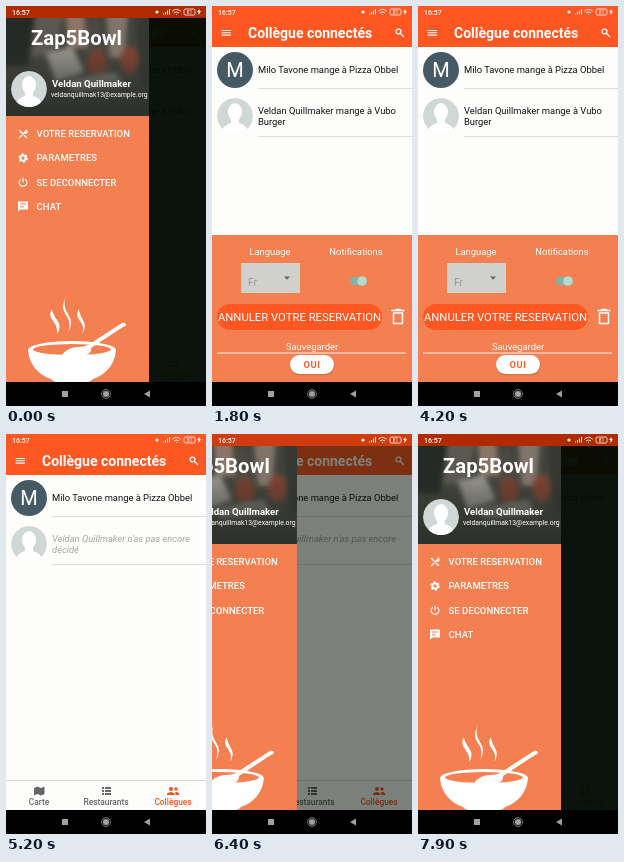
Recreate the animation shown at these times as an HTML page. Size 200 by 400 pixels, loop 8000 ms.

```html
<!DOCTYPE html>
<html lang="fr">
<head>
<meta charset="utf-8">
<style>
  html, body { margin: 0; width: 100%; height: 100%; overflow: hidden; background: #000; }
  svg { display: block; width: 100vw; height: 100vh; font-family: Roboto, sans-serif; font-size: 9.4px; }
  .bold { font-weight: 700; }
  .mid { font-weight: 500; }
  .center { text-anchor: middle; }
  .white { fill: #fff; }
  .line { fill: none; stroke: #fff; stroke-linecap: round; stroke-linejoin: round; }
</style>
</head>
<body>
<svg viewBox="0 0 200 400">
  <defs>
    <filter id="soft" x="-30%" y="-30%" width="160%" height="160%"><feGaussianBlur stdDeviation="2.500"/></filter>
    <linearGradient id="dusk" x2="0" y2="1">
      <stop offset=".35" stop-color="#2b2e29" stop-opacity="0"/>
      <stop offset="1" stop-color="#2b2e29" stop-opacity=".9"/>
    </linearGradient>
    <clipPath id="header"><rect y="12" width="143" height="98"/></clipPath>
    <clipPath id="face"><circle r="18"/></clipPath>
    <g id="person" clip-path="url(#face)">
      <circle r="18" fill="#d0d8d5"/>
      <ellipse cy="-4" rx="7" ry="9" fill="#fff"/>
      <path d="M-4 2H4V7Q13 9 14 19H-14Q-13 9-4 7Z" fill="#fff"/>
    </g>
    <g id="people">
      <circle cx="-2" cy="-2" r="2"/><circle cx="3" cy="-2" r="1.7"/>
      <path d="M-6 4V2.5Q-2-.5 1.500 2.500V4ZM2.500 4V2L2 1Q5.500 .5 6 2.500V4Z"/>
    </g>
  </defs>

  <rect width="200" height="376" fill="#fdfefc"/>
  <rect width="200" height="41" fill="#ff5722"/>
  <path class="line" stroke-width="1.1" stroke-linecap="butt" d="M10 24.500H18.500M10 26.800H18.500M10 29.100H18.500"/>
  <text class="bold white" x="36" y="32" font-size="14">Collègue connectés</text>
  <g class="line" stroke-width="1.2"><circle cx="186.500" cy="25.500" r="2.400"/><path d="M188.500 27.500L191.500 30.500"/></g>

  <circle cx="23" cy="64" r="18" fill="#455a64"/>
  <text class="white center" x="23" y="71" font-size="20">M</text>
  <text x="46" y="67" fill="#111">Milo Tavone mange à Pizza Obbel</text>
  <use href="#person" x="23" y="110"/>
  <g id="decided" fill="#111">
    <text x="46" y="108">Veldan Quillmaker mange à Vubo</text>
    <text x="46" y="119">Burger</text>
  </g>
  <g id="undecided" fill="#a3a5a3" font-style="italic">
    <text x="46" y="108">Veldan Quillmaker n'as pas encore</text>
    <text x="46" y="119">décidé</text>
  </g>
  <path d="M46 82.500H200M46 130.500H200" stroke="#d5d8d5" stroke-width=".8"/>

  <path d="M0 346.500H200" stroke="#d8dad8"/>
  <g class="center mid" font-size="8.4" fill="#666">
    <path d="M28 354l3.500-1.500 3.500 1.500 3.500-1.500V360l-3.500 1.500-3.500-1.500-3.500 1.500Z"/>
    <text x="33" y="371">Carte</text>
    <path d="M96 354H98M99 354H105M96 357H98M99 357H105M96 360H98M99 360H105" stroke="#666" stroke-width="2"/>
    <text x="100" y="371">Restaurants</text>
    <g fill="#f4511e"><use href="#people" x="167" y="357"/><text x="167" y="371">Collègues</text></g>
  </g>

  <g id="sheet">
    <rect y="229" width="200" height="147" fill="#f47f51"/>
    <g class="white center">
      <text x="58" y="249">Language</text>
      <text x="144" y="249">Notifications</text>
      <text x="100" y="344">Sauvegarder</text>
    </g>
    <rect x="29" y="257" width="59" height="30" fill="#d0d1cc"/>
    <text x="36" y="280" font-size="10" fill="#969894">Fr</text>
    <circle id="pick" cx="75" cy="272" r="10" fill="#9da3a0"/>
    <path d="M72 270.500H78L75 273.700Z" fill="#606663"/>
    <rect id="track" x="138" y="271" width="17" height="8" rx="4"/>
    <circle id="thumb" cy="275" r="4.800"/>
    <rect x="5" y="298" width="165" height="26" rx="13" fill="#ff5722"/>
    <text class="white center" x="87.500" y="315.300" font-size="11.300">ANNULER VOTRE RESERVATION</text>
    <circle id="press" cx="186" cy="311" r="10.500" fill="#fbab89"/>
    <path class="line" stroke-width="1.5" stroke-linecap="butt" d="M180 304.500H192M184 303.500H188"/>
    <path id="bin" class="line" stroke-width="1.500" d="M181.500 307H190.500V317.500H181.500Z"/>
    <path d="M5 347H194" stroke="#fff" stroke-width=".9"/>
    <rect x="78" y="350" width="45" height="19.500" rx="9.700" fill="#c76440" opacity=".5"/>
    <rect id="ok" x="78" y="349" width="44" height="19" rx="9.500"/>
    <text class="bold center" x="100" y="362" fill="#f4612f" letter-spacing=".5">OUI</text>
  </g>

  <rect id="scrim" y="12" width="200" height="364" fill="#020b03"/>

  <g id="drawer">
    <rect y="12" width="143" height="364" fill="#f47f51"/>
    <g clip-path="url(#header)">
      <rect y="12" width="143" height="98" fill="#41433c"/>
      <g filter="url(#soft)">
        <path d="M-8 8H30L22 60H-8Z" fill="#272b27"/>
        <path d="M30 8H58L48 50H26Z" fill="#5a5851"/>
        <path d="M40 48L66 40L78 66L50 76Z" fill="#8e8d86"/>
        <path d="M60 8H78L82 42H62Z" fill="#8c7567"/>
        <path d="M78 20L92 12L100 44L82 50Z" fill="#4b4a43"/>
        <ellipse cx="91" cy="57" rx="10" ry="13" fill="#74402f"/>
        <path d="M100 8H122L118 52H104Z" fill="#81746a"/>
        <ellipse cx="123" cy="54" rx="9" ry="14" fill="#7b4331"/>
        <path d="M130 8H150V80H134Z" fill="#353731"/>
        <path d="M62 74L110 66L118 80L66 86Z" fill="#77766f"/>
      </g>
      <rect y="12" width="143" height="98" fill="url(#dusk)"/>
    </g>
    <g class="white">
      <text class="bold" x="25" y="39" font-size="20.300">Zap5Bowl</text>
      <use href="#person" x="23" y="83"/>
      <text class="bold" x="46" y="81" font-size="9.600">Veldan Quillmaker</text>
      <text x="45" y="91.200" font-size="6.800">veldanquillmak13@example.org</text>
    </g>
    <rect id="tap" y="140" width="143" height="24" fill="#fff"/>
    <g class="white mid" font-size="9.500">
      <text x="30.600" y="131">VOTRE RESERVATION</text>
      <text x="30.600" y="155.300">PARAMETRES</text>
      <text x="30.600" y="179.700">SE DECONNECTER</text>
      <text x="30.600" y="204">CHAT</text>
      <path d="M12 195.500H22V203.500H14L12 206Z"/>
    </g>
    <path d="M14 198H20M14 200.800H18" stroke="#f47f51"/>
    <g class="line" stroke-width="1.300">
      <path d="M13.500 131.500L19.500 125.500M13.500 124.500L20.500 131.500M19.500 125.500L20.500 124M18.500 126.500L20 127.300L21.300 125.500"/>
      <circle cx="17" cy="152" r="2.600" stroke-width="1.900"/>
      <circle cx="17" cy="152" r="4" stroke-width="1.500" stroke-linecap="butt" stroke-dasharray="2.100 2.100"/>
      <path stroke-width="1.100" d="M17 172V176M14.500 173.500A3.900 3.900 0 1 0 19.500 173.500"/>
    </g>
    <g class="white">
      <path d="M22 344C23 359 33 369 45 373Q47 376 50 376H82Q85 376 87 373C99 369 109 359 110 344Z"/>
      <ellipse cx="66" cy="344" rx="44" ry="9"/>
      <ellipse cx="66" cy="343.500" rx="39" ry="5.500" fill="#f47f51"/>
      <path d="M56 349Q62 341 72 341Q78 341 82 339L116 317Q120 316 120 319Q120 320 117 321L85 342Q86 347 80 349Z"/>
      <path d="M46 303Q42 309 47 315T51 328Q56 321 51 314T46 303Z"/>
      <path d="M60 291Q54 301 60 309T62 326Q68 317 62 308T60 291Z"/>
      <path d="M73 303Q69 309 74 315T76 328Q81 321 77 314T73 303Z"/>
    </g>
  </g>

  <rect id="shade" width="200" height="12" fill="#b02b00"/>
  <g class="white">
    <text class="mid" x="6" y="8.700" font-size="7">16:57</text>
    <circle cx="151" cy="6" r="1.600"/>
    <path d="M157 8.500V7.500H158V8.500ZM159 8.500V6H160V8.500ZM161 8.500V4.500H162V8.500ZM163 8.500V3H164V8.500Z"/>
    <path class="line" stroke-width=".9" d="M166.500 5Q170.500 1.500 174.500 5M168.300 6.700Q170.500 5 172.700 6.700M170.500 8.300V8.400"/>
    <rect x="178" y="3" width="11" height="6" rx="1.500" fill="none" stroke="#fff" stroke-width=".8"/>
    <text class="center" x="183.500" y="8" font-size="5">81</text>
    <path d="M191 6L193.500 3V5.300H195L192.500 9V6Z"/>
  </g>

  <rect y="376" width="200" height="24" fill="#000"/>
  <g fill="#a0a0a0">
    <rect x="56" y="385" width="6" height="6"/>
    <circle cx="100" cy="388" r="3"/>
    <circle cx="100" cy="388" r="4.300" fill="none" stroke="#a0a0a0" stroke-width=".8"/>
    <path d="M138 388L144 384.500V391.500Z"/>
  </g>
</svg>
<script>
const LOOP = 8000, STEP = 100, WIDTH = 143;
const el = id => document.getElementById(id);
const set = (id, name, value) => el(id).setAttribute(name, value);
const show = (id, on) => set(id, "opacity", on ? 1 : 0);
const within = (t, from, to) => t >= from && t < to;

// Linear interpolation through [position, value] pairs
function track(x, points) {
  for (let i = 1; i < points.length; i++) {
    const [a, from] = points[i - 1], [b, to] = points[i];
    if (x <= b) return from + (to - from) * (x - a) / (b - a);
  }
  return points.at(-1)[1];
}

const drawerMoves = [[0, 143], [100, 143], [400, 0], [5500, 0], [6100, 59], [6900, 128], [7200, 143]];
const sheetMoves = [[0, 147], [400, 147], [600, 20], [700, 0], [4700, 0], [5000, 147]];
const dimming = [[0, 0], [59, .28], [128, .9], [143, .96]];
const shading = [[0, 0], [59, .4], [128, .95], [143, 1]];

function draw(t) {
  const edge = track(t, drawerMoves);
  set("drawer", "transform", `translate(${edge - WIDTH} 0)`);
  set("scrim", "opacity", track(edge, dimming));
  set("shade", "opacity", track(edge, shading));
  set("sheet", "transform", `translate(0 ${track(t, sheetMoves)})`);

  const cancelled = t >= 5100;
  show("decided", !cancelled);
  show("undecided", cancelled);
  set("tap", "opacity", within(t, 100, 400) ? .18 : 0);
  show("pick", within(t, 700, 1200));
  show("press", within(t, 2700, 3000));
  set("bin", "fill", t >= 2700 ? "#fff" : "none");
  set("ok", "fill", within(t, 4500, 4800) ? "#e4e0dc" : "#fff");

  const on = !within(t, 1900, 3500);
  set("track", "fill", on ? "#7fb5a8" : "#a98d80");
  set("thumb", "fill", on ? "#b9d8cc" : "#deddd8");
  set("thumb", "cx", on ? 150 : 143);
}

const start = performance.now();
function tick() {
  const t = (performance.now() - start) % LOOP;
  draw(Math.floor(t / STEP) * STEP);
  requestAnimationFrame(tick);
}
tick();
</script>
</body>
</html>
```
